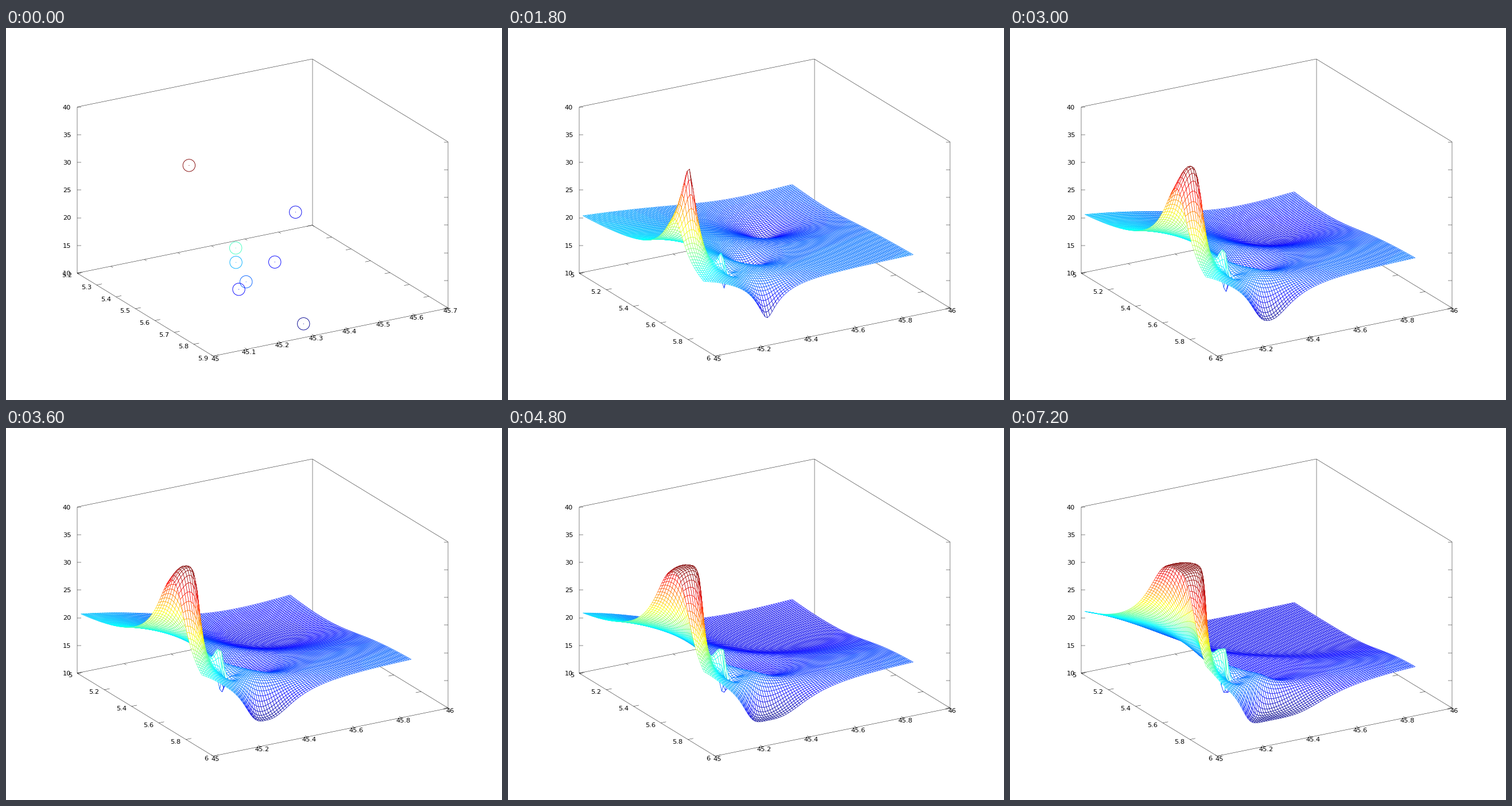
These frames come from a looping animation (864 by 648 pixels, 7.8 s). A matplotlib script:

```python
from itertools import combinations, product

import numpy as np
import matplotlib.pyplot as plt
from matplotlib.animation import FuncAnimation
from matplotlib.collections import LineCollection, PolyCollection

W, H, DPI = 864, 648, 72
FRAMES, INTERVAL = 13, 600

# Screen position of the box corner and its three edge vectors.
ORIGIN = np.array([124.0, 427.0])
EU = np.array([409.5, -83.5])
EV = np.array([236.9, 144.5])
EW = np.array([0.0, -289.5])

X0, Y0 = 45, 5
Z0, Z1 = 10, 40
STEP, N = 0.01, 90

# Measured points: x, y and height.
PX, PY, PZ = np.array([
    (45.056, 5.679, 39.0), (45.609, 5.271, 15.0),
    (45.162, 5.736, 24.0), (45.187, 5.694, 20.2),
    (45.368, 5.581, 15.6), (45.179, 5.760, 18.2),
    (45.188, 5.707, 15.6), (45.269, 5.900, 12.5),
]).T


def project(u, v, w):
    u, v, w = (np.asarray(a, float)[..., None] for a in (u, v, w))
    return ORIGIN + u * EU + v * EV + w * EW


def level(z):
    return (z - Z0) / (Z1 - Z0)


def jet(z):
    """64-step jet colours over the range of z."""
    t = (z - z.min()) / (z.max() - z.min())
    t = (np.minimum(np.floor(t * 64), 63) + 1) / 64
    return np.clip(1.5 - np.abs(4 * t[..., None] - np.array([3, 2, 1])), 0, 1)


GX, GY = np.meshgrid(STEP * np.arange(N), STEP * np.arange(N))
DIST = np.hypot(X0 + GX[..., None] - PX, Y0 + GY[..., None] - PY).clip(1e-9)

# Cells sorted from back to front.
ORDER = np.argsort((0.866 * GY - 0.5 * GX)[:-1, :-1].ravel(), kind="stable")


def surface(power):
    """Inverse distance weighting: quads and their edge colours."""
    weight = DIST ** -power
    z = (weight * PZ).sum(-1) / weight.sum(-1)
    p = project(GX + STEP, GY + STEP, level(z))
    quads = np.stack([p[:-1, :-1], p[:-1, 1:], p[1:, 1:], p[1:, :-1]], axis=2)
    colors = jet(z)[:-1, :-1].reshape(-1, 3)
    return quads.reshape(-1, 4, 2)[ORDER], colors[ORDER]


plt.rcParams["font.family"] = "DejaVu Sans"
fig = plt.figure(figsize=(W / DPI, H / DPI), dpi=DPI, facecolor="white")
ax = fig.add_axes([0, 0, 1, 1])
ax.set_xlim(0, W)
ax.set_ylim(H, 0)
ax.axis("off")


def add_lines(segments):
    lines = LineCollection(segments, colors="black", linewidths=0.48, zorder=1)
    return ax.add_collection(lines)


def add_label(x, y, value, align):
    return ax.text(x, y, f"{value:g}", fontsize=11.4, ha=align,
                   va="center_baseline", zorder=5)


def tick(point, offset):
    return [point, point + np.array(offset)]


def draw_box():
    """All cube edges but the three at the near top corner, and the z axis."""
    near = (0, 1, 1)
    segments = [[project(*a), project(*b)]
                for a, b in combinations(product((0, 1), repeat=3), 2)
                if sum(i != j for i, j in zip(a, b)) == 1
                and near not in (a, b)]
    for z in range(Z0, Z1 + 1, 5):
        left, right = project(0, 0, level(z)), project(1, 1, level(z))
        segments += [tick(left, (7, 0)), tick(right, (-7, 0))]
        add_label(113.3, left[1], z, "right")
    add_lines(segments)


def draw_floor_axes(x0, y0, step, count):
    """Ticks and labels of the two floor axes."""
    segments, labels = [], []
    du, dv = 0.0225 * EU, 0.0155 * EV
    for i in range(count + 1):
        t = i / count
        back, front = project(t, 0, 0), project(t, 1, 0)
        left, right = project(0, t, 0), project(1, t, 0)
        segments += [tick(back, dv), tick(front, -dv),
                     tick(left, du), tick(right, -du)]
        labels += [
            add_label(front[0] + 3.6, front[1] + 4.2,
                      round(x0 + i * step, 1), "center"),
            add_label(left[0] - 8.8, left[1] + 3.5,
                      round(y0 + i * step, 1), "right"),
        ]
    return labels + [add_lines(segments)]


draw_box()
spot_axes = draw_floor_axes(45, 5.2, 0.1, 7)
mesh_axes = draw_floor_axes(X0, Y0, 0.2, 5)

spots = project((PX - 45) / 0.7, (PY - 5.2) / 0.7, level(PZ))
rings = ax.scatter(*spots.T, s=21.4 ** 2, facecolors="none",
                   edgecolors=jet(PZ), linewidths=0.9, zorder=3)
dots = ax.scatter(*spots.T, s=1.2, c=jet(PZ), linewidths=0, zorder=3)
mesh = ax.add_collection(PolyCollection(
    np.zeros((1, 4, 2)), facecolors="white", linewidths=0.65,
    joinstyle="round", zorder=2))


def update(i):
    show_mesh = i > 0
    for artist in spot_axes + [rings, dots]:
        artist.set_visible(not show_mesh)
    for artist in mesh_axes + [mesh]:
        artist.set_visible(show_mesh)
    if show_mesh:
        quads, colors = surface(i / 2)
        mesh.set_verts(quads)
        mesh.set_edgecolor(colors)
    return []


anim = FuncAnimation(fig, update, frames=FRAMES, interval=INTERVAL,
                     repeat=True, repeat_delay=0, blit=False)
plt.show()
```
